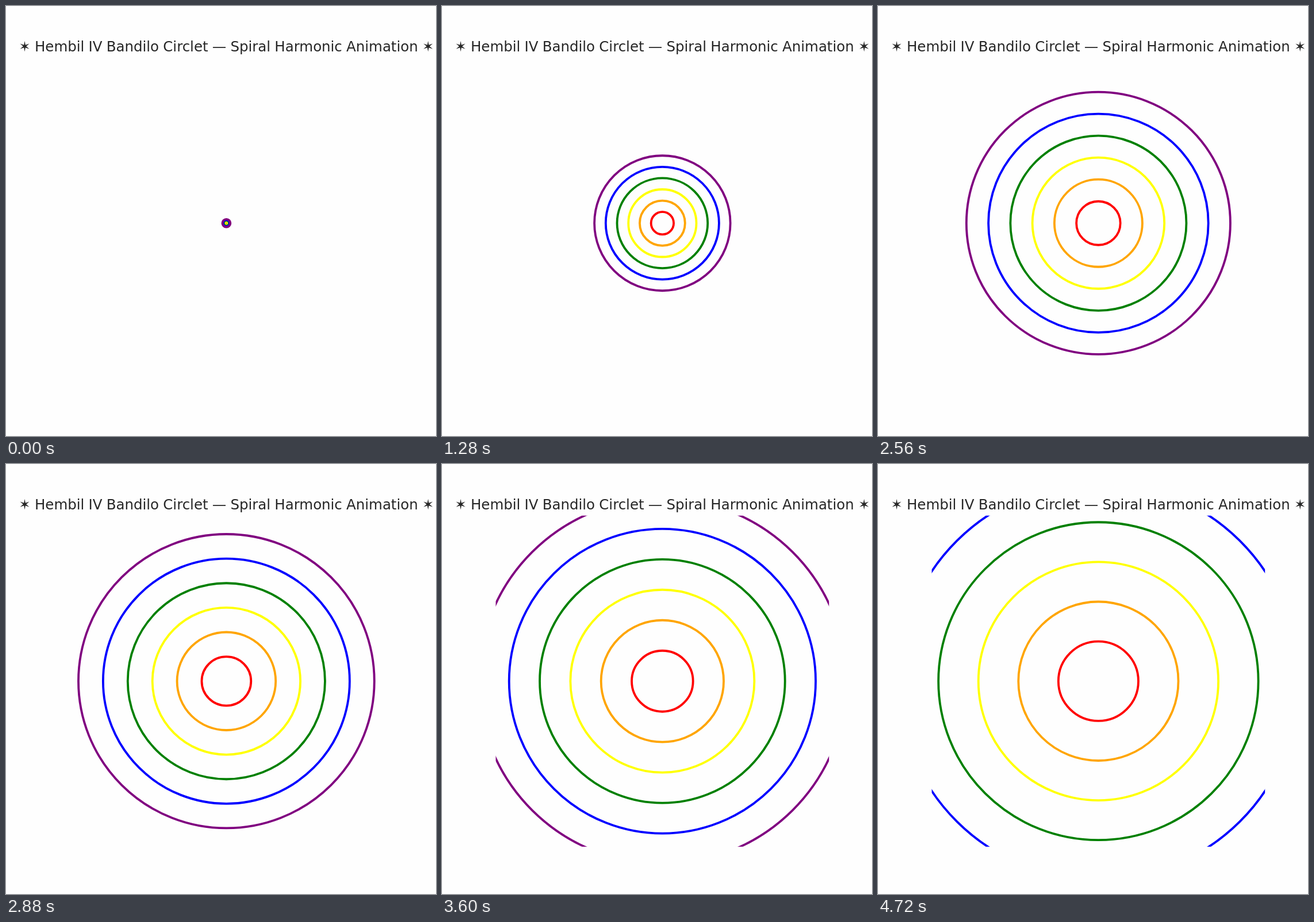
Animation of 748x748 px, one loop 4800 ms. Source, as an HTML page:

```html
<!DOCTYPE html>
<html lang="en">
<head>
<meta charset="utf-8">
<title>Spiral Harmonic Animation</title>
<style>
  html, body { margin: 0; width: 100%; height: 100%; overflow: hidden; background: #fefefe; }
  svg { display: block; width: 748px; height: 748px; }
  text { font: 24.44px "DejaVu Sans", sans-serif; word-spacing: -0.5px; text-anchor: middle; fill: #262626; }
  ellipse { fill: none; stroke-width: 3.82; }
</style>
</head>
<body>
<svg viewBox="0 0 748 748">
  <clipPath id="plot"><rect x="93.5" y="89.76" width="579.7" height="575.96"/></clipPath>
  <g id="rings" clip-path="url(#plot)"></g>
  <text x="383.35" y="79">✶ Hembil IV Bandilo Circlet — Spiral Harmonic Animation ✶</text>
</svg>
<script>
const STEP = 80, STEPS = 60;
const CENTER = { x: 383.35, y: 377.74 };
const UNIT = { x: 1.1594, y: 1.1519 };
const colors = ["red", "orange", "yellow", "green", "blue", "purple"];

const group = document.getElementById("rings");
const rings = colors.map(color => {
  const ring = document.createElementNS("http://www.w3.org/2000/svg", "ellipse");
  ring.setAttribute("cx", CENTER.x);
  ring.setAttribute("cy", CENTER.y);
  ring.setAttribute("stroke", color);
  return group.appendChild(ring);
});

function draw(now) {
  const step = Math.floor(now / STEP) % STEPS;
  rings.forEach((ring, i) => {
    const radius = (i + 1) * (step + 1);
    ring.setAttribute("rx", radius * UNIT.x);
    ring.setAttribute("ry", radius * UNIT.y);
  });
}

const start = performance.now();
function tick() {
  draw(performance.now() - start);
  requestAnimationFrame(tick);
}
tick();
</script>
</body>
</html>
```
